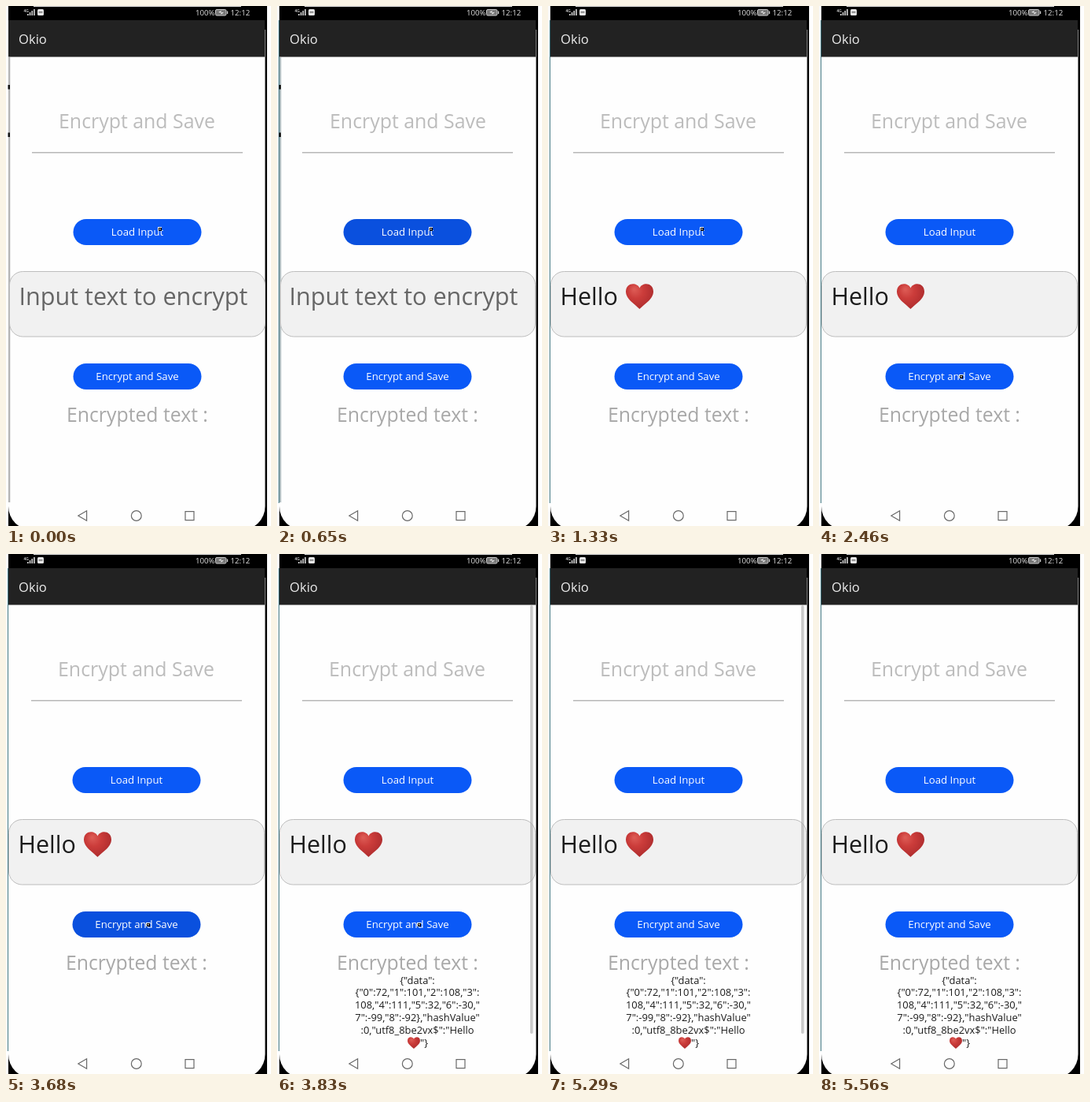
Recreate the animation shown at these times as an HTML page with a canvas. Size 337 px wide and 659 px high, loop 6.08 s.

```html
<!DOCTYPE html>
<html lang="en">
<head>
<meta charset="utf-8">
<title>Encrypt and Save</title>
<style>
html, body { margin: 0; width: 100%; height: 100%; overflow: hidden; background: #fff; }
canvas { display: block; width: 337px; height: 659px; }
</style>
</head>
<body>
<canvas id="stage"></canvas>
<script>
const W = 337, H = 659, LOOP = 6080;
const SANS = '"Open Sans", "Noto Sans", sans-serif';
const BLUE = '#0a59f7', PRESSED = '#0a50de';
const canvas = document.getElementById('stage');
const ctx = canvas.getContext('2d');
const dpr = window.devicePixelRatio || 1;
canvas.width = W * dpr;
canvas.height = H * dpr;

// Pointer stops: time, x, y. It leaves the screen at the end.
const POINTER = [
  [0, 195.5, 282.5], [1920, 195, 310], [2040, 193, 362], [2160, 189, 421.5],
  [2310, 185, 459.5], [2460, 180.5, 469.5], [4600, 185.5, 487.5],
  [4720, 236, 577], [4870, 258, 607], [5020, 283, 645], [5170, -20, -20]
];
// Scrollbar opacity from each time on.
const SCROLLBAR = [
  [0, 0], [3830, 0.5], [3950, 1], [5170, 0.8], [5290, 0.5], [5440, 0.2], [5560, 0]
];
const RESULT = [
  '{"data":', '{"0":72,"1":101,"2":108,"3":', '108,"4":111,"5":32,"6":-30,"',
  '7":-99,"8":-92},"hashValue"', ':0,"utf8_8be2vx$":"Hello'
];

const at = (list, t) => list.filter(k => k[0] <= t).pop();

function rect(x, y, w, h, color) {
  ctx.fillStyle = color;
  ctx.fillRect(x, y, w, h);
}

function text(str, x, y, size, color, weight = 400, align = 'center') {
  ctx.font = `${weight} ${size}px ${SANS}`;
  ctx.textAlign = align;
  ctx.fillStyle = color;
  ctx.fillText(str, x, y);
}

function rounded(x, y, w, h, r) {
  ctx.beginPath();
  ctx.roundRect(x, y, w, h, r);
}

function button(label, x, y, pressed) {
  rounded(x, y, 163, 33, 16.5);
  ctx.fillStyle = pressed ? PRESSED : BLUE;
  ctx.fill();
  text(label, x + 81.5, y + 21.3, 13.2, '#fff', 500);
}

function heart(x, y, w) {
  ctx.save();
  ctx.translate(x, y);
  ctx.scale(w, w);
  ctx.beginPath();
  ctx.moveTo(0.5, 0.17);
  ctx.bezierCurveTo(0.42, -0.03, 0.02, -0.06, 0, 0.29);
  ctx.bezierCurveTo(0, 0.58, 0.35, 0.76, 0.5, 0.93);
  ctx.bezierCurveTo(0.65, 0.76, 1, 0.58, 1, 0.29);
  ctx.bezierCurveTo(0.98, -0.06, 0.58, -0.03, 0.5, 0.17);
  const g = ctx.createRadialGradient(0.3, 0.22, 0.03, 0.45, 0.35, 0.65);
  g.addColorStop(0, '#dc5a54');
  g.addColorStop(0.4, '#cb3c3a');
  g.addColorStop(1, '#a92a2c');
  ctx.fillStyle = g;
  ctx.fill();
  ctx.restore();
}

function statusBar() {
  rect(3, 0, 329, 18, '#000');
  rect(35, 0, 264, 1, '#e4e4e4');
  text('4G', 22.5, 8, 5, '#ddd', 600, 'left');
  for (let i = 0; i < 4; i++) rect(27 + i * 2.7, 10 - i * 2, 1.7, 2 + i * 2, '#ccc');
  rounded(40, 4, 8, 8, 1.5);
  ctx.fillStyle = '#e6e6e6';
  ctx.fill();
  rect(41.5, 7, 5, 1.5, '#777');
  text('100%', 241, 12, 9.7, '#e2e2e2', 400, 'left');
  rounded(266.5, 4.5, 13.5, 7.5, 1.5);
  ctx.fillStyle = '#777';
  ctx.fill();
  ctx.strokeStyle = '#ccc';
  ctx.lineWidth = 1;
  ctx.stroke();
  rect(281, 6.5, 1.2, 3.5, '#ccc');
  ctx.beginPath();
  ctx.moveTo(270, 8);
  ctx.lineTo(274, 6);
  ctx.lineTo(273, 8);
  ctx.lineTo(277, 8.5);
  ctx.lineTo(273, 10.5);
  ctx.lineTo(274, 8.5);
  ctx.fillStyle = '#fff';
  ctx.fill();
  text('12:12', 285.5, 12, 9.7, '#e2e2e2', 400, 'left');
}

function navBar() {
  ctx.strokeStyle = '#686868';
  ctx.lineWidth = 1.2;
  ctx.beginPath();
  ctx.moveTo(91.8, 646);
  ctx.lineTo(102.6, 639.7);
  ctx.lineTo(102.6, 652.3);
  ctx.closePath();
  ctx.stroke();
  ctx.beginPath();
  ctx.arc(165.8, 646, 6.4, 0, Math.PI * 2);
  ctx.stroke();
  ctx.strokeRect(228, 640.6, 11, 11);
}

function phone(shifted) {
  rect(0, 0, W, H, '#fff');
  rect(3, 0, 329, H, '#000');
  rounded(3, 30, 326.5, 634, [0, 0, 30, 30]);
  ctx.fillStyle = '#fefefe';
  ctx.fill();
  statusBar();
  rect(3, 18, 326, 46.5, '#222');
  text('Okio', 16, 48, 16.6, '#ececec', 500, 'left');
  if (shifted) rect(2, 18, 1, 612, '#427782');
}

function edgeStrip(shifted) {
  rect(3, 65, 2.3, 564, shifted ? '#a9b8bc' : '#b4b4b4');
  rect(2.5, 100, 2.5, 5.5, '#111');
  rect(2.5, 160.5, 2.5, 5.5, '#111');
}

function pointer(t) {
  const [, x, y] = at(POINTER, t);
  rect(x - 2.5, y - 2.5, 5, 5, '#fff');
  rect(x - 1.5, y - 1.5, 4, 4, '#000');
  rect(x - 0.5, y - 0.5, 1.5, 1.5, '#fff');
}

function draw(t) {
  const shifted = t >= 650, loaded = t >= 1210, done = t >= 3830;
  const dx = shifted ? -1 : 0;
  ctx.setTransform(dpr, 0, 0, dpr, 0, 0);
  phone(shifted);
  if (!loaded) edgeStrip(shifted);

  text('Encrypt and Save', 166.5 + (loaded ? -1 : 0), 155, 24.9, '#bcbcbc');
  rect(33 + dx, 185, 268, 1.5, '#b8b8b8');
  button('Load Input', 85.5 + dx, 270, t >= 650 && t < 1090);

  const left = loaded ? 3.5 : 4.5;
  rounded(left, 336.5, 329.5 + dx - left, 82.5, 17);
  ctx.fillStyle = '#f1f1f1';
  ctx.fill();
  ctx.strokeStyle = '#bdbdbd';
  ctx.lineWidth = 1;
  ctx.stroke();
  if (loaded) {
    text('Hello', 15.5, 379, 30.5, '#1c1c1c', 400, 'left');
    heart(99, 351.5, 35);
  } else {
    text('Input text to encrypt', 16.5 + dx, 379, 30.6, '#666', 400, 'left');
  }

  button('Encrypt and Save', 85.5 + dx, 453, t >= 3680 && t < 3830);
  text('Encrypted text :', 167 + dx, 526.5, 24.8, '#a8a8a8');
  if (done) {
    RESULT.forEach((line, i) => text(line, 178.5, 544.5 + i * 15.8, 12.9, '#1c1c1c'));
    heart(166, 612, 16);
    text('"}', 182, 623.5, 12.9, '#1c1c1c', 400, 'left');
  }

  const alpha = at(SCROLLBAR, t)[1];
  if (alpha) {
    ctx.globalAlpha = alpha;
    rounded(322, 65, 3.6, 543, 1.8);
    ctx.fillStyle = '#999';
    ctx.fill();
    ctx.globalAlpha = 1;
  }
  navBar();
  pointer(t);
}

const start = performance.now();
function tick() {
  draw((performance.now() - start) % LOOP);
  requestAnimationFrame(tick);
}
tick();
</script>
</body>
</html>
```
